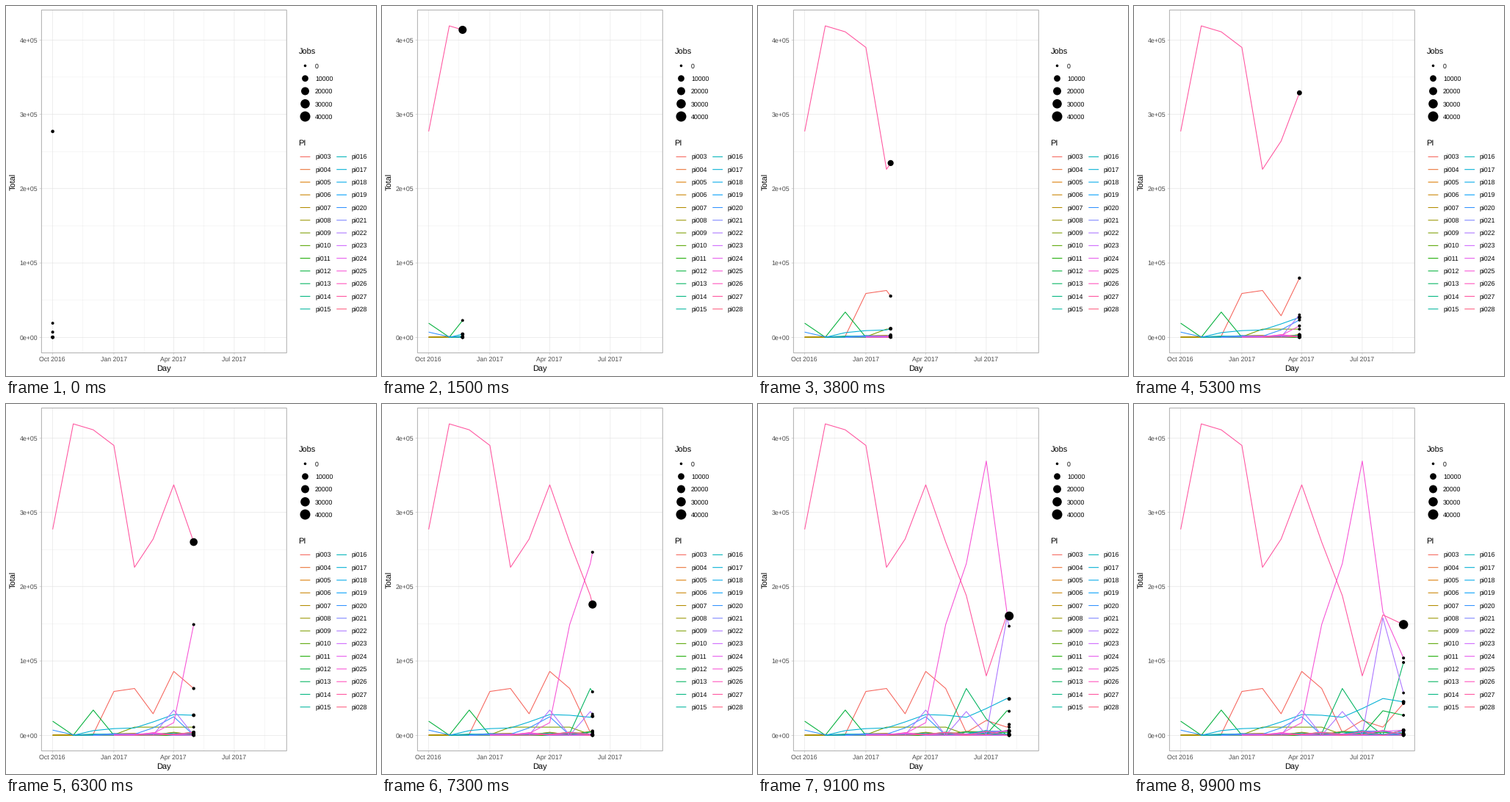
Write a matplotlib script that moves like this. It is 504 by 504 pixels and loops after 10000 ms.

```python
import numpy as np
import matplotlib.pyplot as plt
from matplotlib.animation import FuncAnimation

plt.rcParams.update({
    "font.family": "Liberation Sans",
    "text.hinting": "none",
    "path.snap": False,
})

SIZE, FRAMES, STEP = 504, 100, 9      # nine frames per month
LEFT, RIGHT, TOP, BOTTOM = 48.4, 382.3, 5.5, 472.5
GREY30, GREY70, GREY87 = "#4D4D4D", "#B3B3B3", "#DEDEDE"
LINE = 1.067

MONTHS = np.arange(12)
STARTS = np.arange("2016-10", "2017-10", dtype="datetime64[M]")
DAYS = (STARTS.astype("datetime64[D]") - np.datetime64("2016-10-01")).astype(int)


def px(day):
    return LEFT + (RIGHT - LEFT) * (0.5 + 10 * day / 335) / 11


def py(k):
    """Vertical position of a value given in thousands."""
    return 451.3 - 1.0125 * k


def hcl(hue, c=100, l=65, gamma=1.2):
    """Polar CIE-LUV colour as RGB, deepened by a screen gamma."""
    h = np.radians(hue)
    u = c * np.cos(h) / (13 * l) + 0.1978
    v = c * np.sin(h) / (13 * l) + 0.4683
    y = ((l + 16) / 116) ** 3
    x = 9 * y * u / (4 * v)
    z = -x / 3 - 5 * y + 3 * y / v
    m = np.array([[3.2405, -1.5371, -0.4985],
                  [-0.9693, 1.8760, 0.0416],
                  [0.0556, -0.2040, 1.0572]])
    rgb = np.clip(m @ [x, y, z], 0, 1)
    rgb = np.where(rgb > 0.0031308,
                   1.055 * rgb ** (1 / 2.4) - 0.055, 12.92 * rgb)
    return rgb ** gamma


IDS = range(3, 29)
LEAD = 27
COLORS = {pi: hcl(15 + 360 * i / 26) for i, pi in enumerate(IDS)}

# Busy months in thousands; every other month is quiet noise.
PEAKS = {
    3: {3: 59, 4: 63, 5: 29, 6: 86, 7: 63, 9: 20, 10: 11, 11: 43},
    9: dict.fromkeys(range(4, 8), 11),
    12: {0: 19, 2: 34, 10: 33, 11: 27},
    13: {8: 63, 9: 22, 11: 98},
    17: {m: 4.5 * (m - 1) + 0.9 * m * np.cos(np.pi * (m - 2) / 2)
         for m in range(2, 12)},
    20: {0: 7, 5: 10, 6: 25},
    22: {6: 34, 8: 32, 10: 158, 11: 57},
    25: {6: 17, 7: 149, 8: 231, 9: 369, 10: 166, 11: 104},
    LEAD: dict(enumerate([277, 419, 411, 390, 226, 264,
                          337, 260, 188, 80, 162, 149])),
}

rng = np.random.default_rng(4)


def make_series(pi):
    """First month, monthly totals and monthly dot sizes."""
    peaks = PEAKS.get(pi, {})
    first = max(0, min(peaks) - 1) if peaks else (pi - 4) // 6
    totals = (0.3 + 0.7 * MONTHS) * rng.random(12) ** 3
    for month, value in peaks.items():
        totals[month] = value
    sizes = np.full(12, rng.uniform(1.1, 1.7))
    if pi == LEAD:
        sizes = np.interp(MONTHS, [0, 1, 2, 6, 7, 11],
                          [1.5, 5.5, 4, 2.5, 4.3, 5.2])
    return first, totals, sizes


SERIES = {pi: make_series(pi) for pi in IDS}


def area(size):
    """Scatter area of a dot of the given plot size."""
    return (2.134 * np.asarray(size) + 1.42) ** 2


fig = plt.figure(figsize=(SIZE / 72, SIZE / 72), dpi=72, facecolor="white")
ax = fig.add_axes([0, 0, 1, 1])
ax.set(xlim=(0, SIZE), ylim=(SIZE, 0))
ax.axis("off")


def seg(x, y, color, width):
    ax.plot(x, y, color=color, lw=width, solid_capstyle="butt",
            zorder=1, snap=False)


def label(x, y, text, size=8.8, color="black", **kw):
    ax.text(x, y, text, fontsize=size, color=color, va="baseline", **kw)


def draw_panel():
    for i in range(4):
        day = DAYS[3 * i]
        seg([px(day + 45.5)] * 2, [TOP, BOTTOM], GREY87, LINE / 4)
        seg([px(day)] * 2, [TOP, BOTTOM], GREY87, LINE / 2)
        seg([px(day)] * 2, [BOTTOM, BOTTOM + 2.75], GREY70, LINE / 2)
        name = STARTS[3 * i].item().strftime("%b %Y")
        label(px(day) - 0.4, 484.2, name, color=GREY30, ha="center")
    for n in range(5):
        y = py(100 * n)
        if n:
            seg([LEFT, RIGHT], [py(100 * n - 50)] * 2, GREY87, LINE / 4)
        seg([LEFT, RIGHT], [y, y], GREY87, LINE / 2)
        seg([LEFT - 2.75, LEFT], [y, y], GREY70, LINE / 2)
        label(43.4, y + 3.2, f"{n}e+0{5 if n else 0}", color=GREY30, ha="right")
    ax.add_patch(plt.Rectangle((LEFT, TOP), RIGHT - LEFT, BOTTOM - TOP,
                               fill=False, ec=GREY70, lw=LINE, zorder=5,
                               snap=False))
    label(214.9, 497, "Day", 11, ha="center")
    label(14, 239, "Total", 11, rotation=90, rotation_mode="anchor",
          ha="center")


def draw_legend():
    label(398.4, 66.2, "Jobs", 11)
    steps = np.arange(5)
    rows = 81.4 + 17.28 * steps
    ax.scatter(np.full(5, 407.5), rows, s=area(1 + 5 * np.sqrt(steps / 4.2)),
               c="black", lw=0, snap=False)
    for n, y in zip(steps, rows):
        label(421, y + 3.2, str(10000 * n))
    label(398.4, 190.2, "PI", 11)
    for i, pi in enumerate(IDS):
        col, row = divmod(i, 13)
        x, y = 400.6 + 49.7 * col, 205.4 + 17.28 * row
        seg([x, x + 13.8], [y, y], COLORS[pi], LINE)
        label(x + 20.4, y + 3.2, f"pi{pi:03d}")


draw_panel()
draw_legend()

lines = {pi: ax.plot([], [], color=COLORS[pi], lw=LINE, zorder=3, snap=False,
                     solid_capstyle="butt", solid_joinstyle="round")[0]
         for pi in IDS}
dots = ax.scatter([], [], c="black", lw=0, zorder=4, snap=False)


def update(frame):
    t = frame / STEP
    x = px(np.interp(t, MONTHS, DAYS))
    heads, sizes = [], []
    for pi, line in lines.items():
        first, totals, weights = SERIES[pi]
        if t < first:
            line.set_data([], [])
            continue
        past = (MONTHS >= first) & (MONTHS <= t)
        y = py(np.interp(t, MONTHS, totals))
        line.set_data(np.append(px(DAYS[past]), x),
                      np.append(py(totals[past]), y))
        heads.append((x, y))
        sizes.append(np.interp(t, MONTHS, weights))
    dots.set_offsets(heads)
    dots.set_sizes(area(sizes))
    return [*lines.values(), dots]


anim = FuncAnimation(fig, update, frames=FRAMES, interval=100,
                     repeat=True, repeat_delay=0)
plt.show()
```
